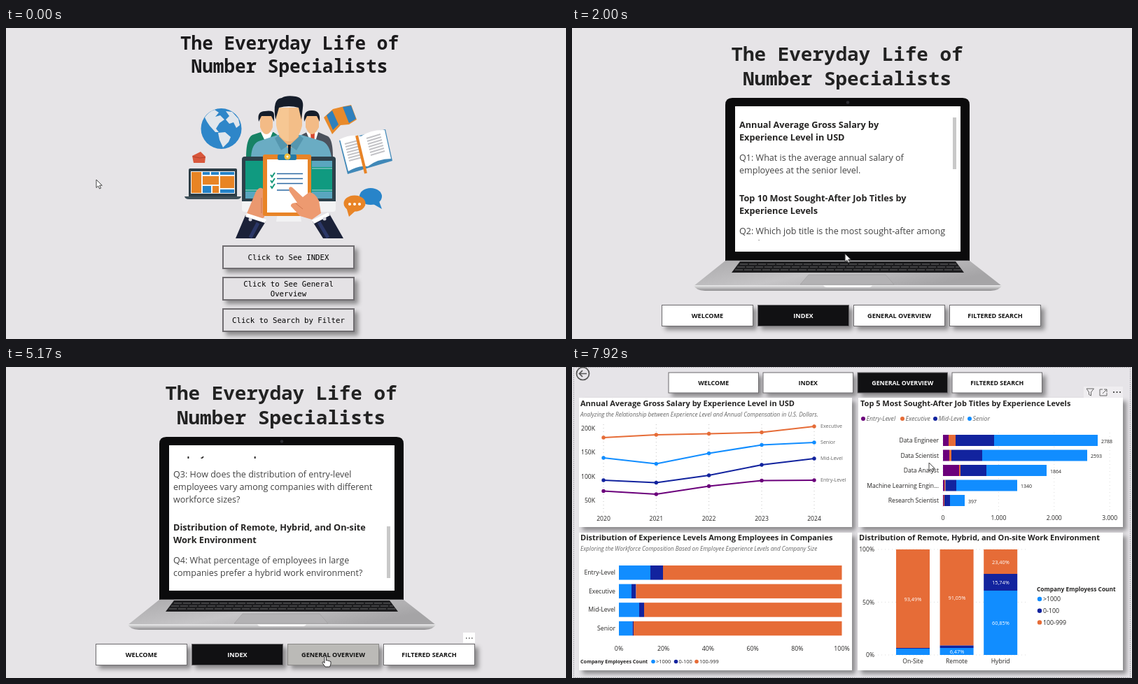
An HTML page for the animation above (8000 ms loop, 800 by 445 pixels).

```html
<!DOCTYPE html>
<html lang="en">
<head>
<meta charset="utf-8">
<title>Dashboard tour</title>
<style>
html, body { margin: 0; width: 100%; height: 100%; overflow: hidden; background: #e6e4e7; }
svg { display: block; width: 100%; height: 100%; font-family: "Open Sans", "Noto Sans", sans-serif; }
.title { font: 600 26px "Noto Sans Mono", monospace; text-anchor: middle; fill: #1b1a1c; }
.mono { font-family: "DejaVu Sans Mono", monospace; }
.shadow { filter: drop-shadow(5px 5px 3px #0006); }
.soft { filter: drop-shadow(0 1px 2px #0004); }

#welcome, #index, #overview, #tip, #dots, #panelHover, #navHover, #lowIcons, #topIcons, #arrow, #hand, #beam {
  animation: 8s step-end infinite; visibility: hidden;
}
#welcome { animation-name: welcome; }
#index { animation-name: index; }
#overview { animation-name: overview; }
#tip { animation-name: tip; }
#dots { animation-name: dots; }
#panelHover { animation-name: panelHover; }
#navHover { animation-name: navHover; }
#lowIcons { animation-name: lowIcons; }
#topIcons { animation-name: topIcons; }
#arrow { animation-name: arrow; }
#hand { animation-name: hand; }
#beam { animation-name: beam; }
@keyframes welcome { 0% { visibility: visible } 23.75%, 100% { visibility: hidden } }
@keyframes index { 0% { visibility: hidden } 23.75% { visibility: visible } 66.5%, 100% { visibility: hidden } }
@keyframes overview { 0% { visibility: hidden } 66.5%, 100% { visibility: visible } }
@keyframes tip { 0% { visibility: hidden } 17.75% { visibility: visible } 23.75%, 100% { visibility: hidden } }
@keyframes dots { 0% { visibility: hidden } 15% { visibility: visible } 23.75%, 100% { visibility: hidden } }
@keyframes panelHover { 0% { visibility: hidden } 27% { visibility: visible } 56.5%, 100% { visibility: hidden } }
@keyframes navHover { 0% { visibility: hidden } 60% { visibility: visible } 66.5%, 100% { visibility: hidden } }
@keyframes lowIcons { 0% { visibility: hidden } 66.5% { visibility: visible } 85%, 100% { visibility: hidden } }
@keyframes topIcons { 0% { visibility: hidden } 85%, 100% { visibility: visible } }
@keyframes arrow {
  0% { visibility: visible } 15% { visibility: hidden } 23.75% { visibility: visible }
  28% { visibility: hidden } 56.5% { visibility: visible } 60% { visibility: hidden } 66.5%, 100% { visibility: visible }
}
@keyframes hand {
  0% { visibility: hidden } 15% { visibility: visible } 23.75% { visibility: hidden }
  60% { visibility: visible } 66.5%, 100% { visibility: hidden }
}
@keyframes beam { 0% { visibility: hidden } 28% { visibility: visible } 56.5%, 100% { visibility: hidden } }

#cursor { animation: move 8s ease-in-out infinite; }
@keyframes move {
  0%, 1% { transform: translate(129px, 217px); animation-timing-function: ease-in }
  10.4% { transform: translate(171px, 240px); animation-timing-function: ease-out }
  16%, 24.5% { transform: translate(389px, 324px) }
  32.5%, 52% { transform: translate(524px, 192px) }
  60.5%, 66.5% { transform: translate(455px, 414px) }
  69%, 75% { transform: translate(453px, 414px) }
  91%, 100% { transform: translate(510px, 137px) }
}
#lines { animation: scroll 8s linear infinite; }
#thumb { animation: thumb 8s linear infinite; }
@keyframes scroll {
  0%, 33% { transform: none } 37%, 38.5% { transform: translateY(-76px) }
  47%, 48.2% { transform: translateY(-182px) } 51%, 100% { transform: translateY(-232px) }
}
@keyframes thumb {
  0%, 33% { transform: none } 37%, 38.5% { transform: translateY(33px) }
  47%, 48.2% { transform: translateY(79px) } 51%, 100% { transform: translateY(100px) }
}
</style>
</head>
<body>
<svg viewBox="0 0 800 445" preserveAspectRatio="none">
<defs>
  <clipPath id="view"><path d="M234 128H552V304H234Z"/></clipPath>
  <linearGradient id="metal" x2="1" y2=".4"><stop stop-color="#aaa9ab"/><stop offset=".5" stop-color="#c6c5c7"/><stop offset="1" stop-color="#a5a4a6"/></linearGradient>
  <linearGradient id="lip" x2="0" y2="1"><stop stop-color="#ececed"/><stop offset="1" stop-color="#8d8c8e"/></linearGradient>
</defs>

<g id="welcome">
  <text class="title" x="405" y="31">The Everyday Life of</text>
  <text class="title" x="405" y="64">Number Specialists</text>

  <circle cx="307.500" cy="144" r="29" fill="#2e86c9"/>
  <path fill="#e0e6ec" d="M284 128Q289 120 298 117L304 121 299 127 306 125 312 131 305 136 300 144 304 149 299 149 291 140 287 134ZM303 150L313 149 321 156 318 163 310 171 305 160ZM314 119L323 120 332 130 334 139 329 143 325 135 319 137 314 131 319 126Z"/>
  <path fill="#d8573c" d="M266 183L278 177 285 184 284 193 268 193Z"/><path d="M267 184L277 186 285 185" stroke="#b5412c" fill="none"/>

  <rect x="261" y="201" width="69" height="42" rx="2" fill="#2c3d47"/>
  <path fill="#f3f3f3" d="M264 205H327V237H264Z"/>
  <path fill="#e88424" d="M265 206H279V236H265ZM281 212H304V224H281ZM306 212H326V229H306ZM295 226H304V236H295Z"/>
  <path fill="#2583c8" d="M281 206H291V210H281ZM293 206H304V210H293ZM306 206H326V210H306ZM306 231H326V236H306ZM281 226H293V236H281Z"/>
  <path d="M255 241H336Q335 245 330 245H261Q256 245 255 241Z" fill="#40515a"/>

  <path fill="#178265" d="M343 185Q343 158 352 153L364 149H382L392 156V185Z"/>
  <path fill="#4b515c" d="M418 185V155L430 149H446L460 155Q467 160 467 185Z"/>
  <path fill="#fff" d="M364 149H381L373 168ZM429 149H446L439 172Z"/>
  <path fill="#d9482e" d="M435 150H441L440 171 436 166Z"/>
  <path fill="#f3bb86" d="M363 125H381V142Q377 152 372 152T363 142ZM428 125H447V142Q442 152 437 152T428 142Z"/>
  <path fill="#151d2a" d="M361 134Q358 119 370 119 383 117 383 124V134L379 126H365ZM426 134Q424 118 436 118 450 117 448 134L444 126H430Z"/>
  <path fill="#6aacc3" d="M350 185Q351 166 361 162L388 153H422L452 162Q462 166 465 185Z"/>
  <path fill="#efb27b" d="M390 145H418V159L405 174 390 159Z"/>
  <path fill="#f6c793" d="M386 114H423V139Q418 162 404 162T386 139Z"/>
  <path fill="#f3be88" d="M404 114H423V139Q418 162 404 162Z"/>
  <path fill="#5596ae" d="M389 154L403 168 393 175 384 158ZM420 154L405 168 415 175 425 158Z"/>
  <path fill="#151d2a" d="M385 131Q380 101 394 100 400 96 414 98 426 100 424 114L422 131 418 114Q404 110 390 114ZM403 167H407L406 184H403Z"/>

  <rect x="337" y="184" width="134" height="79" rx="4" fill="#f3f3f4"/>
  <path fill="#2d414b" d="M341 184H467Q471 184 471 188V248H337V188Q337 184 341 184Z"/>
  <path fill="#109a80" d="M342 190H466V244H342Z"/>
  <path fill="#5aa6bf" d="M437 190H466V199H437ZM437 234H466V244H437ZM342 234H367V244H342Z"/>
  <path stroke="#b9d6de" d="M437 201H466M437 232H466M342 232H367"/>
  <path fill="#f2f2f3" d="M388 264H420L422 277H386Z"/>

  <path fill="#ea986f" d="M343 268L357 234Q364 224 369 233V271L354 278Z"/>
  <rect x="367" y="181" width="69" height="88" rx="3" fill="#e88427"/>
  <path fill="#fff" d="M373 188H431V264H373Z"/>
  <rect x="388" y="181" width="27" height="8" rx="2" fill="#257aa5"/><circle cx="402" cy="184" r="4.500" fill="#f2bf3d"/><circle cx="402" cy="184" r="1.500" fill="#fff"/>
  <path fill="none" stroke="#15987b" stroke-width="2" d="M378 210L380 213 384 207M378 218L380 221 384 215M378 226L380 229 384 223"/>
  <path stroke="#2c6aa3" stroke-width="1.600" d="M387 208.500H424M387 215.500H424M387 222.500H424M387 232H410"/>
  <path fill="#ed9a70" d="M404 229Q407 225 411 230L424 242 433 235Q441 235 447 247L450 265 437 274 420 269 407 255Q406 250 416 250L405 234Z"/>
  <path stroke="#d0764f" fill="none" d="M365 243V265M414 251L424 259"/>
  <path fill="#1b2138" d="M342 268L371 277 356 301H328ZM438 277L462 266 482 301H453Z"/>
  <path fill="#fff" d="M344 265L372 274 370 279 342 270ZM437 275L460 264 463 268 440 280Z"/>
  <path stroke="#2b3767" stroke-width="5" d="M360 279L349 300M447 278L460 300"/>
  <circle cx="349" cy="274" r="2.500" fill="#d4d4dc"/><circle cx="455" cy="273" r="2.500" fill="#d4d4dc"/>

  <path fill="#e88a2c" d="M454 128L467 116 479 113 493 110 501 131 490 138 478 139 466 152Z"/>
  <path fill="#2f80bd" d="M458 125L466 118 475 138 467 146ZM481 113L493 111 500 130 490 136Z"/>

  <path fill="#4088b8" d="M476 161L542 145 552 190 488 209Z"/>
  <path fill="#fff" d="M477 159Q494 151 507 155 522 145 541 146L550 187Q531 187 517 198 504 196 489 205Z"/>
  <path stroke="#c3c3c7" stroke-width="2" d="M484 166L503 161M485 170L504 165M486 174L505 169M487 178L506 173M488 182L507 177M489 186L508 181M490 190L509 185M515 158L535 152M516 162L536 156M517 166L537 160M518 170L538 164M519 174L539 168M520 178L540 172M521 182L541 176"/>
  <path stroke="#e88427" stroke-width="4" d="M501 154L514 208"/>

  <path fill="#2884c9" d="M533 248L537 259 523 251Z"/><ellipse cx="521" cy="241" rx="16" ry="12" fill="#2884c9"/>
  <path fill="#e88427" d="M486 256L490 270 501 260Z"/><ellipse cx="498" cy="251" rx="15.500" ry="11.500" fill="#e88427"/>
  <g fill="#fff"><circle cx="491" cy="252" r="2"/><circle cx="498" cy="252" r="2"/><circle cx="505" cy="252" r="2"/></g>

  <g id="buttons" class="mono"></g>
  <g id="dots"><path fill="none" stroke="#929094" stroke-width="2" d="M310 312H497V344H310Z"/><path fill="#fff" d="M481 294H498V309H481Z"/><path stroke="#555" stroke-width="1.500" stroke-dasharray="1.500 2.500" d="M485 302H495"/></g>
  <g id="tip"><path class="soft" fill="#fff" d="M345 281H463V300H409L403 307 397 300H345Z"/></g>
</g>

<g id="index">
  <g class="title" style="font-size:27.600px;fill:#222"><text x="393" y="47">The Everyday Life of</text><text x="393" y="82">Number Specialists</text></g>
  <path fill="url(#metal)" d="M219 333H568L614 369H174Z"/>
  <path fill="#1d1d1f" d="M240 334H548L560 350H228Z"/>
  <path stroke="#777" stroke-width=".8" stroke-dasharray="11 2" d="M240 338H549M236 342H553M233 346H556"/>
  <path fill="#b3b2b4" stroke="#9c9b9d" stroke-width=".6" d="M338 353H448L460 367H326Z"/>
  <path fill="url(#lip)" d="M174 368H614Q612 375 598 376H190Q176 375 174 368Z"/><path fill="#fafafa" d="M359 368H429Q428 371 424 371H364Q360 371 359 368Z"/>
  <path fill="#0b0b0c" d="M219 333V110Q219 100 229 100H558Q568 100 568 110V333Z"/>
  <path stroke="#39393b" d="M220 332.500H567"/><circle cx="394" cy="106.500" r="2.300" fill="#2c2d33"/>
  <path fill="#fff" d="M233 112H555V320H233Z"/>
  <g clip-path="url(#view)"><g id="lines"></g></g>
  <path id="thumb" fill="#c8c8c8" d="M544 128H549V202H544Z"/>
  <g id="panelHover"><path fill="none" stroke="#e3e3e3" d="M236 125.500H551M236 304.500H551"/><path fill="#fff" d="M535 108H551V123H535Z"/><path stroke="#555" stroke-width="1.500" stroke-dasharray="1.500 2.500" d="M538 116.500H549"/></g>
  <g id="indexNav"></g>
</g>

<g id="overview">
  <path fill="#e6e4e8" d="M0 0H800V445H0Z"/>
  <path fill="none" stroke="#77757a" stroke-dasharray="1 2" d="M2.500 .5H797.500V444.500H2.500Z"/>
  <g fill="none" stroke="#555" stroke-width="1.700"><circle cx="15.500" cy="9.500" r="9"/><path d="M21 9.500H10.500M15 5L10.500 9.500 15 14"/></g>
  <g id="overviewNav"></g>
  <g class="shadow" fill="#fff"><path d="M10 44H400V229H10ZM409 44H787V229H409ZM10 237H400V434H10ZM408 237H787V434H408Z"/></g>
  <g id="charts"></g>
  <g id="lowIcons"><path fill="#eeecef" d="M697 220H784V235H697Z"/><path stroke="#555" stroke-width="1.400" d="M706.500 225V232M706.500 222V223.500"/><g class="tools" transform="translate(737 228)"></g></g>
  <g id="topIcons"><path fill="#efedf0" d="M731 28H787V44H731Z"/><g class="tools" transform="translate(740 36)"></g></g>
</g>

<g id="cursor">
  <path id="arrow" fill="#fff" stroke="#333" stroke-width=".9" d="M0 0V11.500L2.700 9 4.600 13 6.500 12.200 4.700 8.200H8.300Z"/>
  <path id="hand" fill="#fff" stroke="#222" stroke-width=".9" d="M0 1Q1.300-1 2.500 1V6L4 5.500 5.200 6.500 6.800 6.200 7.500 7.200 9 7.500V11L7.500 15H1L-3 9.500Q-3.200 7.500-1.200 8L0 9.500Z"/>
  <path id="beam" fill="none" stroke="#222" stroke-width="1.100" d="M-2.500-5.500H-.8L0-4.800 .8-5.500H2.500M0-4.800V4.800M-2.500 5.500H-.8L0 4.800 .8 5.500H2.500"/>
</g>
</svg>
<script>
const NAVY = '#12239e', BLUE = '#118dff', ORANGE = '#e66c37', PURPLE = '#6b007b';
const put = (sel, html) => document.querySelectorAll(sel).forEach(el => el.insertAdjacentHTML('beforeend', html));
const rect = (x, y, w, h, fill, extra = '') => `<rect x="${x}" y="${y}" width="${w}" height="${h}" fill="${fill}" ${extra}/>`;
const dot = (x, y, r, fill) => `<circle cx="${x}" cy="${y}" r="${r}" fill="${fill}"/>`;
// Text is placed by its vertical centre.
const text = (x, y, size, str, extra = '') =>
  `<text x="${x}" y="${y + size * .36}" font-size="${size}" ${extra}>${str}</text>`;
const MID = 'text-anchor="middle" ', END = 'text-anchor="end" ', BOLD = 'font-weight="700" ', ITALIC = 'font-style="italic" ';
const GREY = 'fill="#666" ', DARK = 'fill="#252423" ';

// Welcome page
[['Click to See INDEX'], ['Click to See General', 'Overview'], ['Click to Search by Filter']].forEach((rows, i) => {
  const y = 312 + i * 45;
  put('#buttons', rect(310, y, 187, 32, '#e4e2e5', 'stroke="#706d71" stroke-width="2" class="shadow"') +
    rows.map((row, k) => text(403.5, y + 16 + (k - (rows.length - 1) / 2) * 14, 10.7, row, MID)).join(''));
});
put('#tip', text(404, 290.5, 8, 'CTRL+click here to follow link', MID + 'fill="#333"'));

// Navigation bars
function nav(sel, x, y, w, h, step, size, active, hover = '') {
  ['WELCOME', 'INDEX', 'GENERAL OVERVIEW', 'FILTERED SEARCH'].forEach((name, i) => {
    const on = i === active, left = x + i * step;
    put(sel, rect(left, y, w, h, on ? '#111113' : '#fff', 'stroke="#6d6b6e" class="shadow"') + (i === 2 ? hover : '') +
      text(left + w / 2, y + h / 2, size, name, MID + BOLD + `fill="${on ? '#fff' : '#111'}"`));
  });
}
nav('#indexNav', 128.5, 396.5, 130, 30, 137, 9.1, 1, '<g id="navHover">' +
  rect(402.5, 396.5, 130, 30, '#bbbab7', 'stroke="#8a8987"') + rect(653, 380, 17, 15, '#fff') +
  '<path stroke="#555" stroke-width="1.5" stroke-dasharray="1.5 2.5" d="M657 388H667"/></g>');
nav('#overviewNav', 138, 8, 128.5, 29, 135, 8.8, 2);

// Scrolling index: text and its centre line
[[138, 'Annual Average Gross Salary by', 1], [156, 'Experience Level in USD', 1],
 [185, 'Q1: What is the average annual salary of'], [203, 'employees at the senior level.'],
 [243, 'Top 10 Most Sought-After Job Titles by', 1], [261, 'Experience Levels', 1],
 [290, 'Q2: Which job title is the most sought-after among'], [308, 'employees?'],
 [337, 'Distribution of Experience Levels Among', 1], [355, 'Employees in Companies', 1],
 [385, 'Q3: How does the distribution of entry-level'], [403, 'employees vary among companies with different'], [421, 'workforce sizes?'],
 [461, 'Distribution of Remote, Hybrid, and On-site', 1], [479, 'Work Environment', 1],
 [508, 'Q4: What percentage of employees in large'], [526, 'companies prefer a hybrid work environment?']
].forEach(([y, str, bold]) => put('#lines', text(239, y, bold ? 12.7 : 12.55, str, bold ? BOLD + DARK : 'fill="#444"')));

const chart = (...parts) => put('#charts', parts.join(''));
const heading = (x, y, str) => text(x, y, 11, str, BOLD + DARK);
const subheading = (y, str) => text(12, y, 8.2, str, ITALIC + GREY);
// Bar segments between consecutive edges
const segments = (y, h, edges, colors) => colors.map((c, i) => rect(edges[i], y, edges[i + 1] - edges[i], h, c)).join('');

// Salary lines
chart(heading(12, 52, 'Annual Average Gross Salary by Experience Level in USD'),
  subheading(68, 'Analyzing the Relationship between Experience Level and Annual Compensation in U.S. Dollars.'));
const years = [45, 120.3, 195.6, 271, 346];
years.forEach((x, i) => chart(`<path stroke="#c4c4c4" stroke-dasharray="1 4" d="M${x} 82V208"/>`, text(x, 217, 8.6, 2020 + i, MID + DARK)));
[200, 150, 100, 50].forEach((v, i) => chart(text(33, 88 + i * 34.4, 8.6, v + 'K', END + DARK)));
[['Executive', ORANGE, [101, 97, 95.5, 93.5, 85]], ['Senior', BLUE, [130, 138.5, 123.5, 111.5, 108]],
 ['Mid-Level', NAVY, [162, 165.5, 155, 140, 131]], ['Entry-Level', PURPLE, [177.5, 182, 170.5, 162.5, 162]]
].forEach(([name, color, ys]) => chart(
  `<polyline fill="none" stroke="${color}" stroke-width="2" points="${ys.map((y, i) => years[i] + ',' + y).join(' ')}"/>`,
  ...ys.map((y, i) => dot(years[i], y, 2.7, color)), text(355, ys[4] - .5, 7.1, name, GREY)));

// Job titles
chart(heading(412, 52, 'Top 5 Most Sought-After Job Titles by Experience Levels'));
[['Entry-Level', 416, PURPLE], ['Executive', 472, ORANGE], ['Mid-Level', 519, NAVY], ['Senior', 568, BLUE]]
  .forEach(([name, x, c]) => chart(dot(x, 74, 3, c), text(x + 4.5, 74, 8.8, name, ITALIC + GREY)));
[0, 1, 2, 3].forEach(v => chart(`<path stroke="#ddd" stroke-dasharray="1 4" d="M${530 + v * 79.4} 94V206"/>`,
  text(530 + v * 79.4, 216, 8.6, v ? v + '.000' : 0, MID + DARK)));
[['Data Engineer', 2788, [538, 548, 603, 751]], ['Data Scientist', 2593, [539, 542, 586, 736]],
 ['Data Analyst', 1864, [553, 555, 592, 678]], ['Machine Learning Engin...', 1340, [532, 533.5, 549, 636]],
 ['Research Scientist', 397, [531, 532, 540, 561]]
].forEach(([name, total, edges], i) => {
  const y = 105 + i * 21.5;
  chart(text(524, y, 8.6, name, END + DARK), segments(y - 8, 16, [530, ...edges], [PURPLE, ORANGE, NAVY, BLUE]),
    text(edges[3] + 5, y + 1, 7, total, DARK));
});

// Experience levels
chart(heading(12, 244, 'Distribution of Experience Levels Among Employees in Companies'),
  subheading(260, 'Exploring the Workforce Composition Based on Employee Experience Levels and Company Size'));
[['Entry-Level', 112, 130], ['Executive', 85, 91.5], ['Mid-Level', 96, 103], ['Senior', 86.5, 88]].forEach(([name, a, b], i) => {
  const y = 294 + i * 26.6;
  chart(text(62, y, 8.7, name, END + DARK), segments(y - 10, 20.5, [67, a, b, 385.5], [BLUE, NAVY, ORANGE]));
});
for (let i = 0; i < 6; i++) chart(text(67 + i * 63.7, 403, 8.8, i * 20 + '%', MID + DARK));
chart(text(12, 421.5, 7.1, 'Company Employees Count', BOLD + DARK));
const sizes = [['&gt;1000', BLUE], ['0-100', NAVY], ['100-999', ORANGE]];
sizes.forEach(([name, c], i) => {
  const x = [116, 148.5, 178][i];
  chart(dot(x, 421.5, 2.8, c), text(x + 4, 421.5, 7.4, name, DARK));
});

// Work environment
chart(heading(410, 244, 'Distribution of Remote, Hybrid, and On-site Work Environment'));
['100%', '50%', '0%'].forEach((v, i) => chart(text(432, 261 + i * 75.5, 8.6, v, END + DARK),
  `<path stroke="#ddd" stroke-dasharray="1 4" d="M437 ${261 + i * 75.5}H650"/>`));
[['On-Site', 402, 403], ['Remote', 398.5, 402], ['Hybrid', 296, 320]].forEach(([name, a, b], i) => {
  const x = 463 + i * 62.6, edges = [261, a, b, 412];
  chart(...[ORANGE, NAVY, BLUE].map((c, k) => rect(x, edges[k], 48, edges[k + 1] - edges[k], c)),
    text(x + 24, 421, 8.6, name, MID + DARK));
});
[[487, 332, '93,49%'], [550, 330, '91,05%'], [550, 407, '6,47%'], [612.5, 279, '23,40%'], [612.5, 308, '15,74%'], [612.5, 366, '60,85%']]
  .forEach(([x, y, v]) => chart(text(x, y, 7.4, v, MID + 'fill="#fff"')));
chart(text(664, 318, 8.4, 'Company Employess Count', BOLD + DARK));
sizes.forEach(([name, c], i) => chart(dot(668, 332 + i * 16.7, 3.2, c), text(673, 332 + i * 16.7, 8.8, name, DARK)));

// Filter, focus and more icons
put('.tools', '<path fill="none" stroke="#666" d="M-5-5H5.5L1.5 0V5L-1.5 3.5V0ZM18-4H14V5H24V1M20-4H24V0M24-4L18 2"/>' +
  '<path stroke="#555" stroke-width="2" stroke-dasharray="2 2.500" d="M33 0H44"/>');
</script>
</body>
</html>
```
